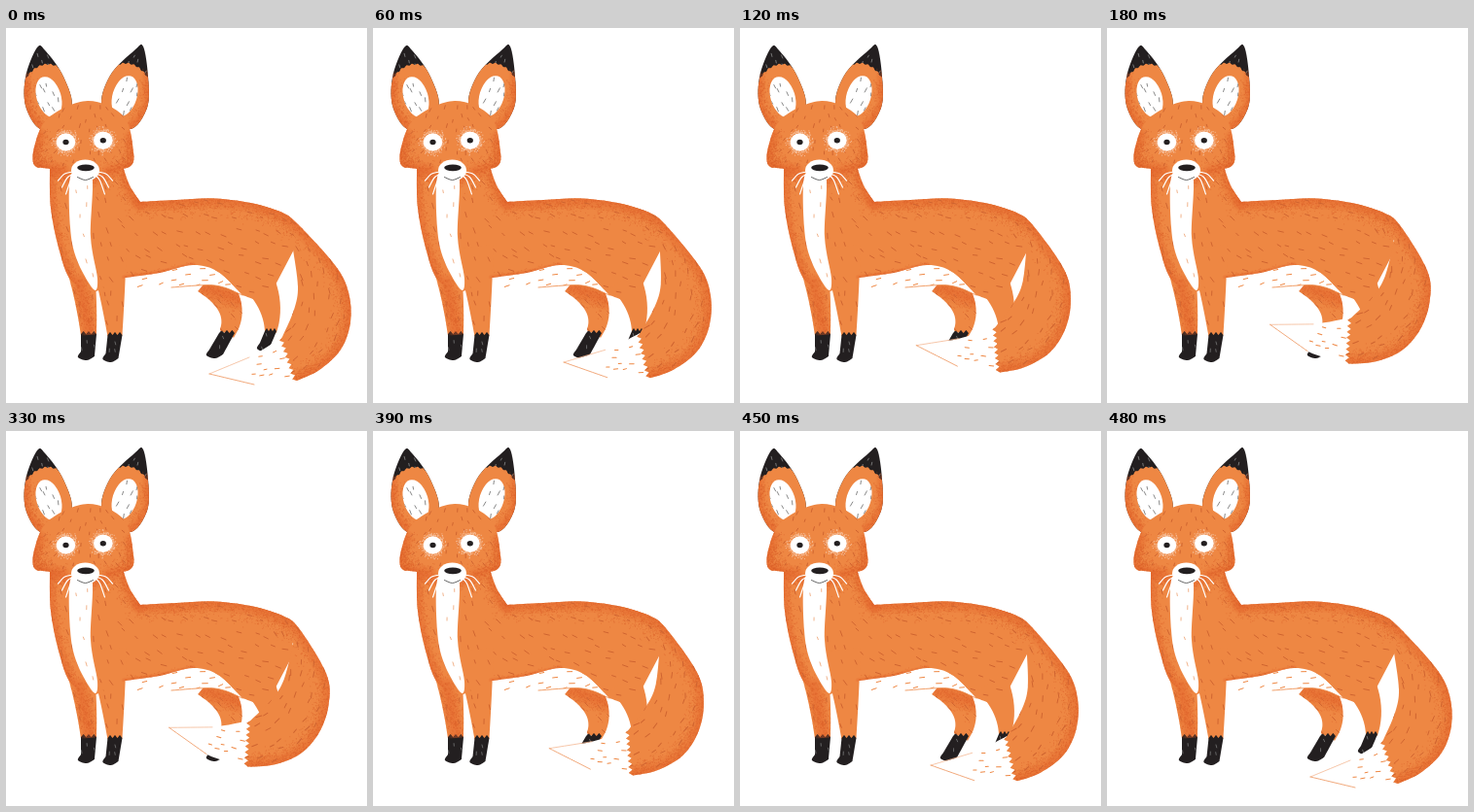
An HTML page with a canvas that plays this animation: 371x386 px, repeating every 810 ms.

```html
<!DOCTYPE html>
<html lang="en">
<head>
<meta charset="utf-8">
<title>Fox wagging its tail</title>
<style>
html, body { margin: 0; width: 100%; height: 100%; overflow: hidden; background: #fff; }
canvas { display: block; width: 371px; height: 386px; }
</style>
</head>
<body>
<canvas id="stage"></canvas>
<script>
const W = 371, H = 386;
const LOOP = 810, STEP = 60, STEPS = 4, WAG_END = 480, SWING = 31;
const ORANGE = '#ee8743', SHADE = '#dc5f28', HAIR = '#cf6430', BLACK = '#231f20', WHITE = '#fff';
const PIVOT = [319, 224];

const canvas = document.getElementById('stage');
const ctx = canvas.getContext('2d');
const ratio = window.devicePixelRatio || 1;
canvas.width = Math.round(W * ratio);
canvas.height = Math.round(H * ratio);

const mix = (a, b, t) => a + (b - a) * t;

function random(seed) {
  return () => {
    seed = (seed + 0x6D2B79F5) | 0;
    let t = Math.imul(seed ^ (seed >>> 15), 1 | seed);
    t = (t + Math.imul(t ^ (t >>> 7), 61 | t)) ^ t;
    return ((t ^ (t >>> 14)) >>> 0) / 4294967296;
  };
}

// smooth curve through the points, continuing the path
function spline(path, pts, closed) {
  const n = pts.length;
  const at = i => closed ? pts[(i + n) % n] : pts[Math.max(0, Math.min(n - 1, i))];
  for (let i = 0; i < (closed ? n : n - 1); i++) {
    const a = at(i - 1), b = at(i), c = at(i + 1), d = at(i + 2);
    path.bezierCurveTo(b[0] + (c[0] - a[0]) / 6, b[1] + (c[1] - a[1]) / 6,
                       c[0] - (d[0] - b[0]) / 6, c[1] - (d[1] - b[1]) / 6, c[0], c[1]);
  }
}

function curve(pts, closed = false) {
  const path = new Path2D();
  path.moveTo(...pts[0]);
  spline(path, pts, closed);
  return path;
}

// closed outline; corners fall where two segments meet
function shape(...segs) {
  const path = new Path2D();
  segs.forEach((seg, i) => {
    if (i) path.lineTo(...seg[0]); else path.moveTo(...seg[0]);
    spline(path, seg);
  });
  path.closePath();
  return path;
}

function zigzag([ax, ay], [bx, by], teeth, depth) {
  const len = Math.hypot(bx - ax, by - ay), pts = [];
  for (let i = 0; i <= teeth * 2; i++) {
    const t = i / (teeth * 2), d = i % 2 ? depth / len : 0;
    pts.push([mix(ax, bx, t) - (by - ay) * d, mix(ay, by, t) + (bx - ax) * d]);
  }
  return pts.slice(1).map((p, i) => [pts[i], p]);
}

// tapering band along a quadratic bend
function limb(hip, knee, ankle, r0, r1) {
  const left = [], right = [], n = 6;
  for (let i = 0; i <= n; i++) {
    const t = i / n, r = mix(r0, r1, t);
    const [x, y] = [0, 1].map(k => mix(mix(hip[k], knee[k], t), mix(knee[k], ankle[k], t), t));
    const [dx, dy] = [0, 1].map(k => mix(knee[k] - hip[k], ankle[k] - knee[k], t));
    const len = Math.hypot(dx, dy);
    left.push([x - dy / len * r, y + dx / len * r]);
    right.unshift([x + dy / len * r, y - dx / len * r]);
  }
  return shape(left, right);
}

function oval(x, y, rx, ry, tilt = 0) {
  const path = new Path2D();
  path.ellipse(x, y, rx, ry, tilt, 0, Math.PI * 2);
  return path;
}

function fill(path, color) {
  ctx.fillStyle = color;
  ctx.fill(path);
}

function stroke(path, color, width) {
  ctx.strokeStyle = color;
  ctx.lineWidth = width;
  ctx.stroke(path);
}

function clipped(path, paint) {
  ctx.save();
  ctx.clip(path);
  paint();
  ctx.restore();
}

// short hairs on a jittered grid
function fur(path, [x0, y0, x1, y1], step, color, angle, size = 5, turn = 0) {
  const rnd = random(x0 * 31 + y0), hairs = new Path2D();
  for (let y = y0, row = 0; y < y1; y += step, row++) {
    for (let x = x0 + (row % 2) * step / 2; x < x1; x += step) {
      const px = x + (rnd() - .5) * step * .7, py = y + (rnd() - .5) * step * .7;
      const a = angle(px, py) + (rnd() - .5) * .5, l = size * (.7 + rnd() * .5) / 2;
      hairs.moveTo(px - Math.cos(a) * l, py - Math.sin(a) * l);
      hairs.lineTo(px + Math.cos(a) * l, py + Math.sin(a) * l);
    }
  }
  clipped(path, () => {
    ctx.translate(...PIVOT);
    ctx.rotate(turn);
    ctx.translate(-PIVOT[0], -PIVOT[1]);
    stroke(hairs, color, 1);
  });
}

// grainy shading that fades away from a line
function grain(path, pts, spread, count) {
  const rnd = random(count), off = () => (rnd() + rnd() + rnd() - 1.5) * spread * 1.2;
  clipped(path, () => {
    const edge = curve(pts);
    ctx.globalAlpha = .13;
    for (let k = 1; k <= 4; k++) stroke(edge, SHADE, spread * k * .4);
    ctx.globalAlpha = .5;
    ctx.fillStyle = SHADE;
    for (let i = 0; i < count; i++) {
      const s = rnd() * (pts.length - 1), n = Math.floor(s);
      const [a, b] = [pts[n], pts[n + 1]];
      ctx.fillRect(mix(a[0], b[0], s - n) + off(), mix(a[1], b[1], s - n) + off(), .9, .9);
    }
  });
}

const upright = () => 1.4;
const level = () => -.2;
const flow = x => .35 + 1.05 / (1 + Math.exp((x - 120) / 15));
const aroundTail = (x, y) => Math.atan2(y - 275, x - 250) + Math.PI / 2;

const BACK = [[138, 179], [175, 177], [215, 175.5], [256, 181], [284, 190]];
const FRONT = [[45, 142], [46, 185], [54, 226], [67, 260], [93, 271]];
const BELLY = [[122, 257], [158, 252], [192, 244], [218, 251], [243, 275]];
const UNDERSIDE = [[243, 275], [215, 265], [170, 267], [122, 270]];
const NAPE = [[120, 142], [127, 162], [138, 179]];

const torso = shape(FRONT, BELLY, [[243, 275], [262, 280], [275, 268]],
  [[297, 226], [284, 190]], [...BACK].reverse(), [...NAPE].reverse());
const belly = shape(BELLY, UNDERSIDE);
const chest = curve([[67, 150], [66, 205], [73, 239], [90, 269], [94, 258], [87, 215], [88, 150]], true);
const head = curve([[84, 75], [121, 91], [131, 128], [128, 142], [112, 146],
  [82, 152], [46, 145], [29, 141], [30, 119], [44, 92]], true);

function leg(hip, knee, ankle, toe, r0, r1) {
  const skin = limb(hip, knee, ankle, r0, r1);
  fill(skin, ORANGE);
  const [x, y] = ankle, [tx, ty] = toe, top = y - 1;
  const paw = shape(...zigzag([x - r1, top], [x + r1, top], 3, -3),
    [[x + r1, top], [tx + r1, ty]],
    [[tx + r1, ty], [tx, ty + 4], [tx - r1 - 1, ty + 1], [tx - r1 + 2, ty - 5]]);
  fill(paw, BLACK);
  fur(paw, [tx - r1, y + 5, x + r1, ty], 9, '#666', upright, 3);
  return skin;
}

function drawBody() {
  const farLeg = leg([208, 258], [242, 286], [227, 315], [215, 336], 17, 8);
  grain(farLeg, [[195, 264], [243, 280]], 14, 450);
  fur(farLeg, [205, 272, 242, 312], 12, HAIR, () => .9);
  fill(belly, WHITE);
  stroke(curve(UNDERSIDE.slice(0, 3)), ORANGE, .8);
  fur(belly, [128, 250, 236, 270], 12, ORANGE, level);

  fill(torso, ORANGE);
  leg([258, 258], [276, 285], [272, 313], [265, 329], 17, 6);
  const leftLeg = leg([70, 220], [82, 262], [85, 316], [83, 338], 17, 8);
  const rightLeg = leg([104, 225], [109, 265], [112, 317], [108, 340], 20, 7.5);
  grain(leftLeg, [[76, 262], [86, 314]], 11, 450);
  for (const skin of [leftLeg, rightLeg]) fur(skin, [60, 274, 122, 312], 13, HAIR, upright);

  grain(torso, BACK, 13, 1500);
  grain(torso, FRONT.slice(0, 4), 9, 700);
  grain(torso, [[48, 146], [82, 156], ...NAPE], 11, 1000);
  grain(torso, BELLY.slice(0, 3), 4, 170);
  fur(torso, [52, 164, 298, 284], 15, HAIR, flow);
  fill(chest, WHITE);
  fur(chest, [72, 166, 92, 262], 15, '#f1b38c', upright, 4);
}

function drawTail(degrees) {
  const a = degrees * Math.PI / 180, c = Math.cos(a), s = Math.sin(a);
  const swing = pts => pts.map(([x, y]) => {
    const dx = x - PIVOT[0], dy = y - PIVOT[1];
    return [PIVOT[0] + dx * c - dy * s, PIVOT[1] + dx * s + dy * c];
  });
  const top = swing([[209, 356], [250, 339], [284, 318]]);
  const under = swing([[299, 363], [255, 367], [209, 356]]);
  const outer = [[256, 181], [284, 190], [301, 203],
    ...swing([[338, 244], [352, 272], [354, 303], [344, 331], [322, 352], [299, 363]])];
  const inner = swing([[284, 318], [296, 290], [300, 266], [295, 228]]);
  const fringe = zigzag([299, 363], [284, 318], 8, -4).map(swing);

  const tip = shape(top, under);
  fill(tip, WHITE);
  stroke(curve(top.slice(0, 2)), '#f4b893', .8);
  stroke(curve(under.slice(1)), '#f0a06e', .9);
  fur(tip, [252, 336, 292, 362], 12, ORANGE, level, 4, a);

  const tail = shape(outer, ...fringe, inner, [[275, 215], [256, 181]]);
  fill(tail, ORANGE);
  grain(tail, outer, 13, 2600);
  fur(tail, [272, 196, 350, 358], 14, HAIR, aroundTail, 5.5, a);
}

// side is -1 for the left ear and 1 for the right; lean moves the tip outwards
function drawEar(cx, cy, side, lean) {
  const outline = [[lean, -51], [23, -20], [22, 12], [4, 34], [-24, 12], [-16, -21], [lean - 9, -47]]
    .map(([u, v]) => [cx + side * u, cy + v]);
  const ear = curve(outline, true);
  const inner = oval(cx - side, cy, 12.5, 21.5, side * .3);
  const box = [cx - 25, cy - 44, cx + 25, cy + 24];

  const soft = [];
  for (let i = 0; i < 60; i++) {
    const a = i / 30 * Math.PI, r = i % 2 ? 1 : 1.04;
    soft.push([cx + Math.cos(a) * 27 * r, cy + 2 + Math.sin(a) * 35 * r]);
  }
  fill(ear, BLACK);
  fur(ear, box, 11, '#777', () => Math.PI / 2 + side * .3, 3);
  clipped(ear, () => fill(curve(soft, true), ORANGE));
  grain(ear, outline.slice(1, 4), 8, 400);
  fill(inner, WHITE);
  fur(inner, box, 10, '#888', () => Math.PI / 2 + side * .3, 4);
}

function drawEye(x, y) {
  const rnd = random(x), r = 9.8;
  ctx.fillStyle = '#f6bd97';
  for (let i = 0; i < 170; i++) {
    const a = rnd() * Math.PI * 2, d = r + rnd() * rnd() * 6;
    ctx.fillRect(x + Math.cos(a) * d - .5, y + Math.sin(a) * d - .5, 1, 1);
  }
  fill(oval(x, y, r, 9.3), WHITE);
  fill(oval(x, y, 3.1, 2.7), BLACK);
}

function drawHead() {
  drawEar(43, 71, -1, 11);
  drawEar(123, 70, 1, 18);
  fill(head, ORANGE);
  grain(head, [[34, 110], [28, 132], [33, 142], [58, 147]], 10, 800);
  grain(head, [[129, 112], [131, 134], [126, 143], [105, 148]], 10, 750);
  fur(head, [40, 82, 128, 144], 11, HAIR, x => Math.PI / 2 - (x - 82) / 60, 3.5);
  drawEye(61.5, 117.5);
  drawEye(99.8, 115.7);

  const x = 81.5;
  for (const side of [-1, 1]) {
    for (let i = 0; i < 3; i++) {
      const reach = 28 - 4 * i;
      stroke(curve([[x + side * 11, 148 + 2 * i], [x + side * reach * .75, 150 + 3.5 * i],
        [x + side * reach, 157 + 7 * i]]), WHITE, 1.2);
    }
  }
  fill(oval(x, 146.5, 14.5, 11), WHITE);
  fill(oval(x + .5, 143.8, 8.8, 3.4), BLACK);
  stroke(curve([[x - 8, 153.5], [x, 156.5], [x + 8, 153.5]]), '#555', .9);
}

function draw(degrees) {
  ctx.setTransform(ratio, 0, 0, ratio, 0, 0);
  ctx.lineCap = ctx.lineJoin = 'round';
  ctx.fillStyle = WHITE;
  ctx.fillRect(0, 0, W, H);
  drawBody();
  drawTail(degrees);
  drawHead();
}

// the tail swings in by steps, rests, and steps back half a beat late
function wagStep(t) {
  if (t >= WAG_END) return 0;
  return Math.min(STEPS, Math.floor(t / STEP), Math.ceil((WAG_END + STEP / 2 - t) / STEP));
}

let shown = -1;
function tick() {
  const step = wagStep(performance.now() % LOOP);
  if (step !== shown) {
    shown = step;
    draw(SWING * (step / STEPS) ** 1.2);
  }
  requestAnimationFrame(tick);
}
tick();
</script>
</body>
</html>
```
